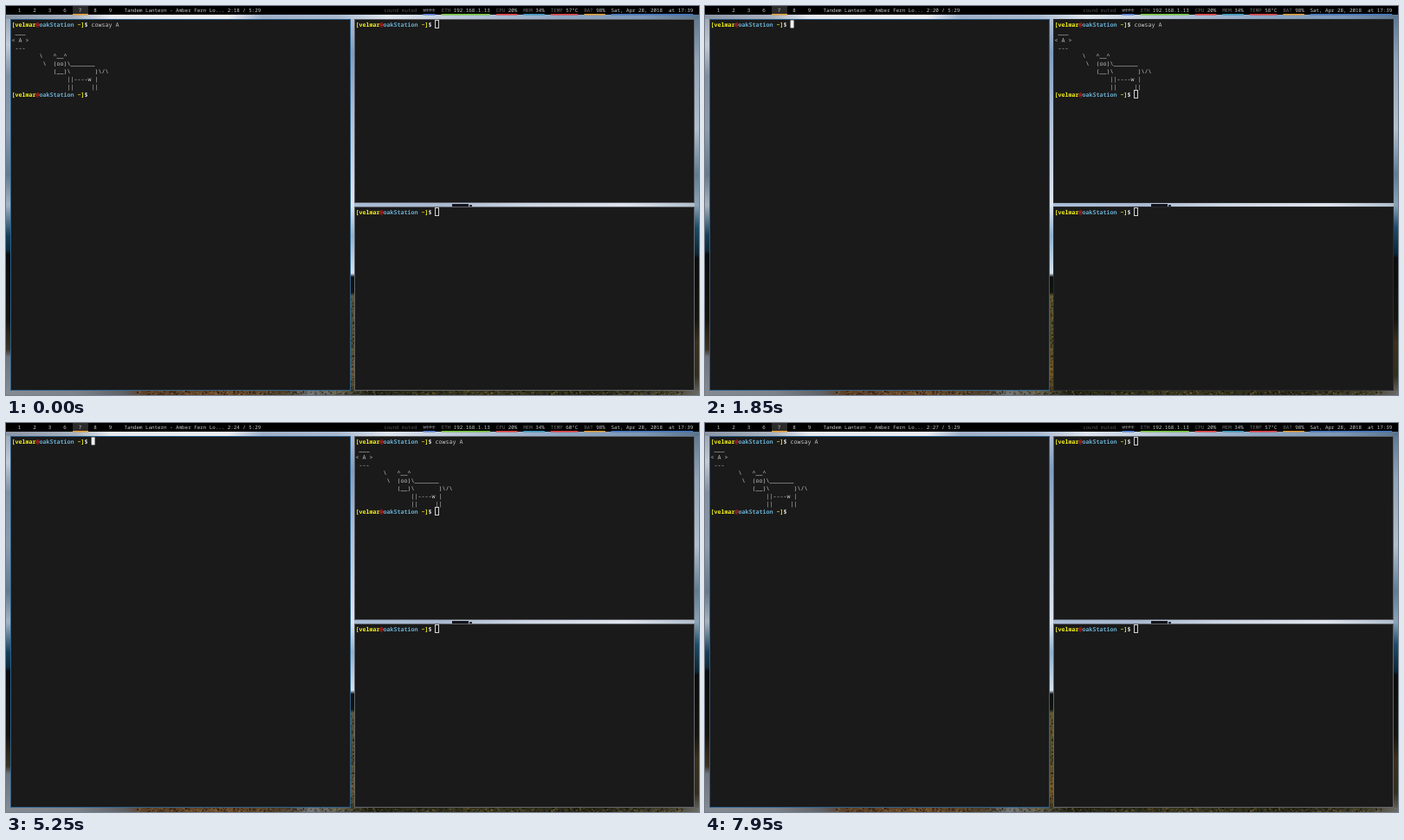
These frames come from a looping animation (800x450 px, 8000 ms). An HTML page with a canvas:

```html
<!DOCTYPE html>
<html lang="en">
<head>
<meta charset="utf-8">
<title>Rotating terminals</title>
<style>
  html, body { margin: 0; width: 100%; height: 100%; overflow: hidden; background: #000; }
  canvas { display: block; }
</style>
</head>
<body>
<canvas id="stage" width="800" height="450"></canvas>
<script>
const ctx = document.getElementById('stage').getContext('2d');
ctx.textRendering = 'geometricPrecision';

const LOOP = 8000, BLINK = 600, ROW = 9;
const TERM = '6.68px "Noto Sans Mono", monospace';
const BAR = '5.85px "Noto Sans Mono", monospace';
const PANES = [
  { x: 5, y: 15, w: 393, h: 430 },
  { x: 402, y: 15, w: 393, h: 213 },
  { x: 402, y: 232, w: 393, h: 213 }
];
const COW = [
  ' ___',
  '< A >',
  ' ---',
  '        \\   ^__^',
  '         \\  (oo)\\_______',
  '            (__)\\       )\\/\\',
  '                ||----w |',
  '                ||     ||'
];
// [start time, pane that holds the cow]
const SWAPS = [[-850, 0], [50, 1], [600, 2], [1200, 0], [1800, 1], [2600, 2],
  [3750, 0], [4950, 1], [5800, 2], [7150, 0]];
const TICKS = [550, 1550, 2550, 3150, 3550, 4550, 5550, 6650, 7600];

const latest = (list, t) => list.filter(e => e[0] <= t).pop();

function box(x, y, w, h, color) {
  ctx.fillStyle = color;
  ctx.fillRect(x, y, w, h);
}

function frame(x, y, w, h, color) {
  ctx.strokeStyle = color;
  ctx.lineWidth = 1;
  ctx.strokeRect(x + .5, y + .5, w - 1, h - 1);
}

// Draws coloured runs one after another and returns the end x
function write(x, y, ...runs) {
  for (const [text, color] of runs) {
    ctx.fillStyle = color;
    ctx.fillText(text, x, y);
    x += ctx.measureText(text).width;
  }
  return x;
}

function gradient(x, y, w, h, stops) {
  const g = w > h ? ctx.createLinearGradient(x, 0, x + w, 0) : ctx.createLinearGradient(0, y, 0, y + h);
  stops.forEach(([at, color]) => g.addColorStop(at, color));
  box(x, y, w, h, g);
}

// Uneven dark and yellow grass inside a strip
function grass(x, y, w, h) {
  for (let i = 0; i < w * h / 5; i++) {
    const n = Math.abs(Math.sin(i * 12.9898 + x) * 43758.5453) % 1;
    const m = Math.abs(Math.sin(i * 78.233 + y) * 12543.123) % 1;
    box(x + n * w, y + m * h, 1.5, 1.5, i % 3 ? 'rgba(0,0,0,.45)' : 'rgba(165,130,60,.45)');
  }
}

function wallpaper() {
  gradient(0, 10, 6, 440, [[0, '#9aa4b2'], [.08, '#c3cad4'], [.16, '#8190a2'], [.3, '#8c9cae'],
    [.42, '#647a8f'], [.5, '#a5b3c0'], [.55, '#496b85'], [.58, '#14405b'], [.62, '#0e2a3b'], [.63, '#090c0f'],
    [.8, '#14130f'], [.84, '#2c2518'], [.88, '#3a3325'], [.9, '#6f767f'], [1, '#858b92']]);
  gradient(397, 10, 6, 440, [[0, '#b3c0d6'], [.1, '#7f9dc2'], [.25, '#a9bdd8'], [.5, '#dfe6f1'],
    [.58, '#8fb2d0'], [.68, '#d5e3ee'], [.69, '#0b0f12'], [.73, '#10140f'], [.74, '#5f5a38'],
    [.85, '#46462c'], [.94, '#705a2d'], [1, '#33321f']]);
  gradient(794, 10, 6, 440, [[0, '#5b7690'], [.12, '#90a4b8'], [.3, '#b2c0cd'], [.42, '#5f7d95'],
    [.5, '#8aa3b7'], [.56, '#1d4d6a'], [.63, '#0b2635'], [.64, '#0b0d0c'], [.8, '#15150f'],
    [.86, '#3a301c'], [.95, '#332e1d'], [1, '#6a6a66']]);
  gradient(0, 10, 800, 5, [[0, '#8a95a5'], [.1, '#aab3c0'], [.15, '#e6e9ef'], [.32, '#eceef3'], [.37, '#9fb0c8'],
    [.48, '#a9b9d0'], [.55, '#dfe5ee'], [.66, '#b9c6d8'], [.8, '#8ea7c4'], [.92, '#7b97b5'], [1, '#5a738c']]);
  gradient(402, 228, 393, 4, [[0, '#a9bdd8'], [.25, '#a8b8cf'], [.5, '#ccd5e2'], [.8, '#dfe4ec'], [1, '#b0becd']]);
  gradient(0, 445, 800, 5, [[0, '#858b92'], [.1, '#7d838b'], [.17, '#5f6166'], [.2, '#5d4028'],
    [.33, '#6b4a2c'], [.4, '#4d402c'], [.44, '#74777a'], [.49, '#5a5948'], [.52, '#272819'],
    [.7, '#38371f'], [.85, '#292919'], [.96, '#45432f'], [1, '#6a6a66']]);
  grass(150, 445, 630, 5);
  grass(398, 335, 4, 110);
  box(515, 229, 19, 3, '#111319');
  box(535, 230, 3, 2, '#25272f');
}

function bar(t) {
  const busy = t >= 5550 && t < 6650;
  const temp = latest([[0, 57], [1550, 58], [3550, 60], [5550, 57]], t)[1];
  const clock = 18 + TICKS.filter(at => at <= t).length;
  const dim = '#6f6f6f', light = '#c8c8c8';
  box(0, 0, 800, 10, '#000');
  ctx.font = BAR;
  box(77, 0, 18, 9, '#2b2b2b');
  box(77, 9, 18, 1.6, '#e0a03c');
  [...'1236789'].forEach((n, i) => write(13.7 + i * 17.5, 6.8, [n, light]));
  write(136.5, 6.8, [`Tandem Lantern - Amber Fern Lo... 2:${clock} / 5:29`, light]);
  write(436, 6.8, ['sound muted', '#505050']);
  const items = [
    [481.5, 'WIFI', '', '#4c78cc'],
    [502.7, 'ETH ', '192.168.1.13', '#74c03c'],
    [565.8, 'CPU ', (busy ? 25 : 20) + '%', '#dc3c3c'],
    [597.3, 'MEM ', '34%', '#3a94b8'],
    [628.8, 'TEMP ', temp + '°C', '#dc3c3c'],
    [667.3, 'BAT ', '98%', '#dc9c3c'],
    [698.5, '', 'Sat, Apr 28, 2018  at 17:39', '#4474bc']
  ];
  for (const [x, label, value, color] of items) {
    const end = write(x, 6.8, [label, dim], [value, light]);
    box(x, 9, end - x, 1.6, color);
  }
  box(481.5, 4.4, 14, .7, '#8a8a8a');
}

function prompt(x, y) {
  ctx.font = 'bold ' + TERM;
  return write(x, y, ['[velmar', '#f4f01c'], ['@', '#e02020'], ['oakStation', '#69aed0'],
    [' ~]', '#f4f01c'], ['$ ', '#eeeeee']);
}

function pane(index, hasCow, cursor, border) {
  const { x, y, w, h } = PANES[index];
  box(x, y, w, h, '#1a1a1a');
  frame(x, y, w, h, border);
  const left = x + 1.5;
  let base = y + 9.4;
  let end = prompt(left, base);
  if (hasCow) {
    ctx.font = TERM;
    write(end, base, ['cowsay A', '#cccccc']);
    for (const line of COW) write(left, base += ROW, [line, '#cccccc']);
    end = prompt(left, base += ROW);
  }
  if (cursor === 'solid') box(end, base - 8, 4, 9, '#f2f2f2');
  if (cursor === 'hollow') frame(Math.round(end) - 1, Math.round(base) - 8, 5, 10, '#d0d0d0');
}

function draw(now) {
  const t = now % LOOP;
  const [start, cowPane] = latest(SWAPS, t);
  const age = t - start;
  const active = age < 50 ? 'hollow' : age % (2 * BLINK) < BLINK ? 'solid' : 'none';
  const edge = t >= 1800 && t < 4950 ? '#2a2b2f' : '#63656c';
  wallpaper();
  bar(t);
  PANES.forEach((p, i) => pane(i, i === cowPane, i ? 'hollow' : active, i ? edge : '#2d6089'));
  requestAnimationFrame(draw);
}

requestAnimationFrame(draw);
</script>
</body>
</html>
```
